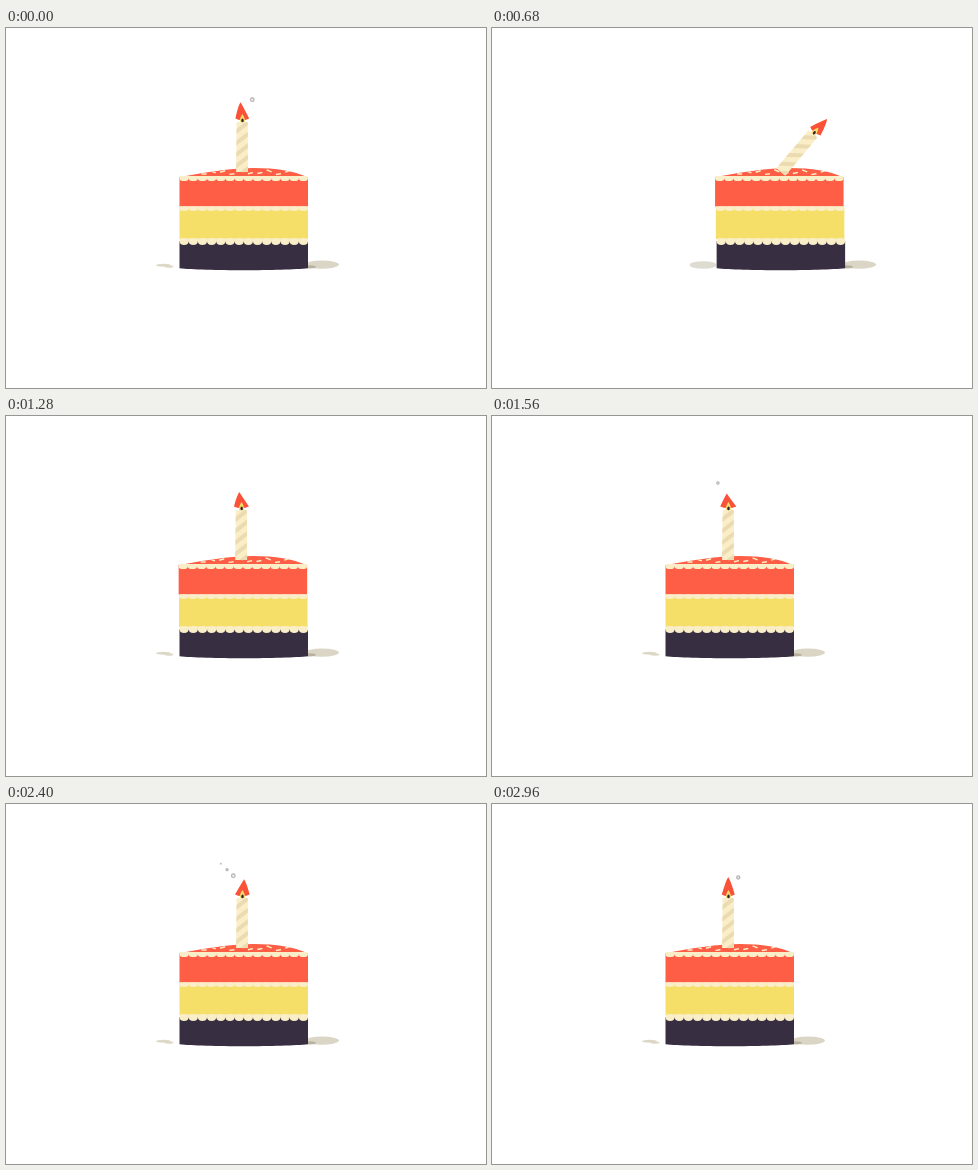
Animation of 480x360 px, one loop 3 s. Source, as an HTML page with a canvas:

```html
<!DOCTYPE html>
<html lang="en">
<head>
<meta charset="utf-8">
<title>Birthday cake</title>
<style>
  html, body { margin: 0; width: 100%; height: 100%; overflow: hidden; background: #fff; }
  canvas { display: block; width: 480px; height: 360px; }
</style>
</head>
<body>
<canvas id="stage" width="480" height="360"></canvas>
<script>
const ctx = document.getElementById('stage').getContext('2d');
const LOOP = 3000, STEP = 40, GONE = 360, ENTER = 600, TAU = Math.PI * 2;
const RED = '#fe5e45', YELLOW = '#f6df69', NAVY = '#382e42', CREAM = '#f9eec7', STRIPE = '#ecdbb0';
const LEFT = 173.5, RIGHT = 302, WIDTH = RIGHT - LEFT, MID = LEFT + WIDTH / 2;

// cosine of a phase counted in turns
const wave = turns => Math.cos(TAU * turns);

// swing that dies out evenly over its life
function swing(amp, age, life, period, phase) {
  const s = Math.max(0, age);
  return amp * Math.max(0, 1 - s / life) * wave(s / period + phase);
}

function oval(x, y, rx, ry, color) {
  ctx.fillStyle = color;
  ctx.beginPath();
  ctx.ellipse(x, y, rx, ry, 0, 0, TAU);
  ctx.fill();
}

function line(x0, y0, x1, y1) {
  ctx.beginPath();
  ctx.moveTo(x0, y0);
  ctx.lineTo(x1, y1);
  ctx.stroke();
}

function shifted(dx, draw) {
  ctx.save();
  ctx.translate(dx, 0);
  draw();
  ctx.restore();
}

function layer(y, bottom, color, bulge) {
  ctx.fillStyle = color;
  ctx.beginPath();
  ctx.moveTo(LEFT, y);
  ctx.lineTo(RIGHT, y);
  ctx.lineTo(RIGHT, bottom);
  ctx.bezierCurveTo(MID + 40, bottom + bulge, MID - 40, bottom + bulge, LEFT, bottom);
  ctx.fill();
}

function icing(y, h, drop) {
  ctx.fillStyle = CREAM;
  ctx.fillRect(LEFT + .3, y, WIDTH - .6, h);
  const n = 14, w = WIDTH / n;
  for (let i = 0; i < n; i++) oval(LEFT + w * (i + .5), y + h, w * .49, drop, CREAM);
}

function topping() {
  ctx.save();
  ctx.fillStyle = RED;
  ctx.beginPath();
  ctx.moveTo(LEFT + 1, 149);
  ctx.bezierCurveTo(200, 144, 226, 140, 248, 140);
  ctx.bezierCurveTo(270, 140, 288, 143, RIGHT - 1, 149);
  ctx.fill();
  ctx.clip();
  ctx.strokeStyle = CREAM;
  ctx.lineWidth = 1.5;
  for (let i = 0; i < 11; i++) {
    const x = 198 + 9.3 * i, y = 144.4 + 1.8 * Math.sin(2.4 * i + 1), lean = Math.sin(2 * i);
    line(x - 2.5, y - lean, x + 2.5, y + lean);
  }
  ctx.restore();
}

function flame(t) {
  const turns = t / 250, stretch = wave(turns - .84);
  const x = 2 * wave(turns - .6), y = -68.5 - 2.5 * stretch, w = 7.35 - .85 * stretch;
  ctx.fillStyle = '#fa5239';
  ctx.beginPath();
  ctx.moveTo(x, y);
  ctx.quadraticCurveTo(x + 2.6, y + 4, w + .2, -53.4);
  ctx.quadraticCurveTo(3, -51.5, .3, -52);
  ctx.quadraticCurveTo(-3, -51.5, -w + .2, -53.4);
  ctx.quadraticCurveTo(x - 2.6, y + 4, x, y);
  ctx.fill();
  ctx.fillStyle = YELLOW;
  ctx.beginPath();
  ctx.moveTo(.3, -58);
  ctx.quadraticCurveTo(3.4, -53.5, 2.6, -50);
  ctx.lineTo(-2, -50);
  ctx.quadraticCurveTo(-2.8, -53.5, .3, -58);
  ctx.fill();
  oval(.4, -51.6, 1.2, 1.9, '#30232d');
}

function candle(t, tilt) {
  ctx.save();
  ctx.translate(236.1 + tilt * .08, 144);
  ctx.rotate(tilt * Math.PI / 180);
  ctx.save();
  ctx.beginPath();
  ctx.moveTo(-6, 0);
  ctx.lineTo(-5.5, -49.5);
  ctx.quadraticCurveTo(0, -51.5, 5.7, -49.5);
  ctx.lineTo(5.8, 0);
  ctx.closePath();
  ctx.fillStyle = CREAM;
  ctx.fill();
  ctx.clip();
  ctx.strokeStyle = STRIPE;
  ctx.lineWidth = 4;
  for (let y = 2; y > -62; y -= 11.5) line(-9, y + 6, 9, y - 8);
  ctx.restore();
  flame(t);
  ctx.restore();
}

function shadows(entering) {
  oval(316, 236.6, 17, 4.2, '#dad5c5');
  oval(304, 238.8, 6, 1.6, '#b9b09d');
  if (entering) {
    oval(160, 237, 13.5, 3.8, '#dedbd0');
  } else {
    oval(157.5, 237.3, 7.5, 1.5, '#dcd7c6');
    oval(163, 238.6, 4.5, 1.2, '#dcd7c6');
  }
}

// a spark that rises, turns into a smoke ring and shrinks away
function puff(t, birth, x0, drift) {
  const u = ((t - birth + LOOP) % LOOP) / 500;
  if (u >= 1) return;
  const x = x0 + drift * u, y = 79 - 23 * u;
  const r = u < .3 ? 1.3 + 3.6 * u : .4 + 2 * (1 - u) / .7;
  if (u < .2) return oval(x, y, r, r, '#f3dc9b');
  oval(x, y, r, r, '#b2aeb0');
  if (r > 1.3) oval(x, y, r - 1.1, r - 1.1, '#efebe9');
}

function smoke(t) {
  puff(t, 1300, 228, -4);
  puff(t, 1810, 254, -6);
  puff(t, 2840, 246, 1);
  for (let i = 0; i < 3; i++) puff(t, 2240 - 130 * i, 235, -24);
}

function render(t) {
  ctx.fillStyle = '#fff';
  ctx.fillRect(0, 0, 480, 360);
  if (t >= GONE && t < ENTER) return;

  const live = t >= ENTER;
  const slide = live ? 274 * Math.pow(Math.max(0, 1 - (t - 560) / 280), 3) : 0;
  const lag = live ? swing(22, t - 675, 640, 440, .25) : 0;
  const tilt = live ? swing(40, t - 680, 560, 320, 0) : 0;
  const midLag = lag / 2;

  shifted(slide, () => {
    shadows(live && t < 800);
    layer(213, 240.3, NAVY, 2.6);
    shifted(midLag, () => layer(179, 211, YELLOW, 0));
    icing(210.5, 3, 3.4);
    shifted(lag, () => {
      topping();
      layer(149, 178.6, RED, 0);
      icing(148, 2.5, 2.6);
    });
    shifted(midLag, () => icing(178.4, 2.4, 2.2));
    shifted(lag, () => candle(t, tilt));
  });
  smoke(t);
}

const start = performance.now();
function tick() {
  const t = (performance.now() - start) % LOOP;
  render(Math.floor(t / STEP) * STEP);
  requestAnimationFrame(tick);
}
tick();
</script>
</body>
</html>
```
